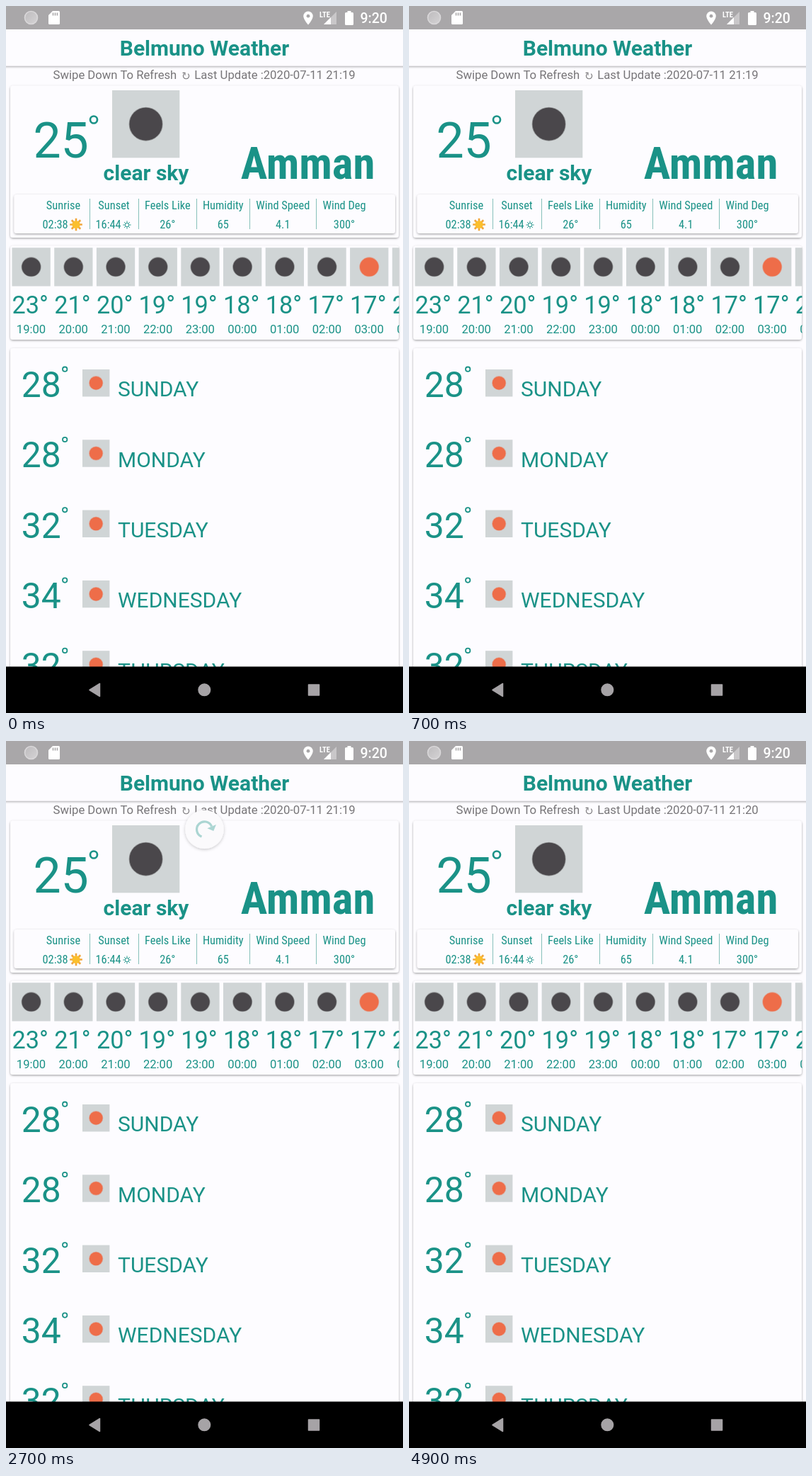
An HTML page for the animation above (5000 ms loop, 561x998 px).

```html
<!DOCTYPE html>
<html lang="en">
<head>
<meta charset="utf-8">
<title>Weather</title>
<style>
  html, body { margin: 0; width: 100%; height: 100%; overflow: hidden; background: #fdfcff; }
  svg { display: block; width: 100vw; height: 100vh; }
  text { font-family: Roboto, sans-serif; fill: #1a9287; }
  .mid { text-anchor: middle; }
  .bold { font-weight: 700; }
  .cond { font-family: "Roboto Condensed", Roboto, sans-serif; font-stretch: condensed; }
  .note { fill: #777578; }
  .light { fill: #fff; }
  .card { fill: #fdfcff; filter: url(#lift); }
  .tile { fill: #d0d5d6; }
  .ring { fill: none; stroke: #1a9287; }
</style>
</head>
<body>
<svg id="stage" viewBox="0 0 561 998" xmlns="http://www.w3.org/2000/svg">
  <defs>
    <filter id="lift" x="-5%" y="-10%" width="110%" height="125%">
      <feDropShadow dx="0" dy="1.2" stdDeviation="1.4" flood-color="#000" flood-opacity=".36"/>
    </filter>
    <filter id="float" x="-30%" y="-30%" width="160%" height="160%">
      <feDropShadow dx="0" dy="1.2" stdDeviation="2" flood-color="#000" flood-opacity=".22"/>
    </filter>
    <clipPath id="strip"><rect x="6" y="338" width="549.5" height="133"/></clipPath>
    <linearGradient id="moon" x1="0" y1="0" x2="1" y2="1">
      <stop offset="0" stop-color="#bdbbbd"/><stop offset="1" stop-color="#d5d3d5"/>
    </linearGradient>
  </defs>
  <rect width="561" height="998" fill="#fdfcff"/>

  <g id="content"></g>

  <path id="glow" d="M0 85H561V108Q280.5 188 0 108Z" fill="#000"/>
  <g id="spinner">
    <circle r="27.3" fill="#fbfafc" filter="url(#float)"/>
    <g id="mark">
      <path id="arc" class="ring" stroke-width="3.2"/>
      <path id="head" d="M-6.8 0H6.8L0 6.8Z" fill="#1a9287"/>
    </g>
  </g>

  <rect x="-6" y="20" width="573" height="64.5" fill="#fdfcff" filter="url(#lift)"/>
  <text class="mid bold" x="280.5" y="70" font-size="30">Belmuno Weather</text>

  <g fill="#fff">
    <rect width="561" height="33" fill="#a9a7a9"/>
    <circle cx="35.5" cy="16.5" r="9" fill="url(#moon)" stroke="#d9d7d9" stroke-width="1.6"/>
    <path d="M66 7H74.5Q76 7 76 8.5V24.5Q76 26 74.5 26H61.5Q60 26 60 24.5V13Z"/>
    <path d="M66.5 9.5v4M69.5 9.5v4M72.5 9.5v4" stroke="#a9a7a9" stroke-width="1.6"/>
    <path d="M427 7.5a6.7 6.7 0 0 1 6.7 6.7c0 4.8-6.7 12.3-6.7 12.3s-6.7-7.5-6.7-12.3a6.7 6.7 0 0 1 6.7-6.7z"/>
    <circle cx="427" cy="14.2" r="2.4" fill="#a9a7a9"/>
    <path d="M467 8V26H449Z" fill="#c9c7c9"/>
    <path d="M459 16V26H449Z"/>
    <text x="443" y="15.5" font-size="10.5" class="bold cond light">LTE</text>
    <path d="M482.5 7h5v2h2q1.500 0 1.500 1.500v15q0 1.500-1.500 1.500h-9q-1.500 0-1.500-1.500v-15q0-1.500 1.500-1.500h2z"/>
    <text x="500.5" y="23.5" font-size="19.5" font-weight="500" class="light">9:20</text>
  </g>

  <rect y="932.5" width="561" height="65.5"/>
  <g fill="#a6a3a6" stroke="#a6a3a6" stroke-width="1.5" stroke-linejoin="round">
    <path d="M118 965.5L132.5 956.5V974.5Z"/>
    <circle cx="280.3" cy="965.3" r="8.3"/>
    <rect x="427.5" y="958" width="15" height="15"/>
  </g>
</svg>
<script>
const LOOP = 5000, STEP = 100;
const DARK = '#4a474b', ORANGE = '#ee6d49';
const $ = id => document.getElementById(id);

const text = (x, y, size, str, cls = '') =>
  `<text x="${x}" y="${y}" font-size="${size}" class="${cls}">${str}</text>`;
const card = (x, y, w, h) =>
  `<rect class="card" x="${x}" y="${y}" width="${w}" height="${h}" rx="4"/>`;
const ring = (x, y, r, w) =>
  `<circle class="ring" cx="${x}" cy="${y}" r="${r}" stroke-width="${w}"/>`;
// The translucent stroke gives the disc its soft rim.
const tile = (x, y, size, r, color) =>
  `<rect class="tile" x="${x}" y="${y}" width="${size}" height="${size}"/>` +
  `<circle cx="${x + size / 2}" cy="${y + size / 2}" r="${r - 0.4}" fill="${color}"
    stroke="${color}" stroke-opacity=".45" stroke-width="1.6"/>`;

function rays(x, y, from, to) {
  let d = '';
  for (let i = 0; i < 8; i++) {
    const c = Math.cos(i * Math.PI / 4), s = Math.sin(i * Math.PI / 4);
    d += `M${x + c * from} ${y + s * from}L${x + c * to} ${y + s * to}`;
  }
  return d;
}

function notice() {
  return text(66.5, 102.7, 16.7, 'Swipe Down To Refresh', 'note') +
    `<path d="M251.8 95.6A4.1 4.1 0 1 0 257.2 95.6M249.6 94.4H253V97.8"
      fill="none" stroke="#777578" stroke-width="1.1"/>
    <text id="stamp" class="note" x="266.3" y="102.7" font-size="16.7"></text>`;
}

function today() {
  const facts = [
    [81, 'Sunrise'], [152.5, 'Sunset'], [228.3, 'Feels Like', '26°'],
    [306.8, 'Humidity', '65'], [391.3, 'Wind Speed', '4.1'], [478, 'Wind Deg', '300°']
  ];
  let out = card(6, 112.5, 549, 214.5) + card(11.5, 266, 538.5, 55);
  out += text(38.4, 214, 69.8, '25') + ring(124, 160.5, 5, 2.7);
  out += tile(150, 119, 95.3, 23.6, DARK);
  out += text(198, 246, 30, 'clear sky', 'mid bold');
  out += text(426.5, 243.5, 62.8, 'Amman', 'mid bold cond');
  for (const [x, name, value] of facts) {
    out += text(x, 287, 16.4, name, 'mid cond');
    if (value) out += text(x, 314, 16.4, value, 'mid cond');
  }
  out += text(51.5, 314, 16.4, '02:38', 'cond') + text(126.5, 314, 16.4, '16:44', 'cond');
  out += `<path d="${rays(99, 308.5, 5, 8.8)}" stroke="#f2a63a" stroke-width="2.6"/>
    <circle cx="99" cy="308.5" r="5.6" fill="#fbbf2d"/>
    <path d="${rays(171, 309, 3.6, 5.6)}" stroke="#1a9287"/>` + ring(171, 309, 2.8, 1);
  for (const x of [118.5, 187.5, 269.5, 344.5, 438.5])
    out += `<path d="M${x} 272V315" stroke="#86c0ba"/>`;
  return out;
}

function hours() {
  const temps = [23, 21, 20, 19, 19, 18, 18, 17, 17, 20];
  let out = card(6, 338.5, 549, 132.5) + '<g clip-path="url(#strip)">';
  temps.forEach((t, i) => {
    const dx = i * 59.7, hour = String((19 + i) % 24).padStart(2, '0');
    out += tile(8.5 + dx, 341.2, 54.3, 13.6, i < 8 ? DARK : ORANGE);
    out += text(8.5 + dx, 433.5, 34.3, t + '°');
    out += text(35.5 + dx, 462, 16.6, hour + ':00', 'mid');
  });
  return out + '</g>';
}

function days() {
  const list = [[28, 'SUNDAY'], [28, 'MONDAY'], [32, 'TUESDAY'], [34, 'WEDNESDAY'], [32, 'THURSDAY']];
  let out = card(6, 483, 549, 500);
  list.forEach(([t, name], i) => {
    const dy = i * 99.3;
    out += text(21.8, 552 + dy, 49.8, t) + ring(83.2, 512.7 + dy, 3.2, 1.8);
    out += tile(108, 513 + dy, 38.4, 9.7, ORANGE);
    out += text(158, 551.3 + dy, 30, name);
  });
  return out;
}

$('content').innerHTML = notice() + today() + hours() + days();

const ramp = (t, a, b) => Math.min(1, Math.max(0, (t - a) / (b - a)));
const easeOut = p => 1 - (1 - p) * (1 - p);
const point = (deg, r) => {
  const a = deg * Math.PI / 180;
  return [r * Math.cos(a), r * Math.sin(a)];
};

function drawArc(end, sweep) {
  const r = 11, [x0, y0] = point(end - sweep, r), [x1, y1] = point(end, r);
  $('arc').setAttribute('d', `M${x0} ${y0}A${r} ${r} 0 ${sweep > 180 ? 1 : 0} 1 ${x1} ${y1}`);
  $('head').setAttribute('transform', `translate(${x1} ${y1}) rotate(${end})`);
}

function render(t) {
  const pull = easeOut(ramp(t, 2500, 3300));
  const back = easeOut(ramp(t, 3400, 3600));
  const gone = ramp(t, 3950, 4100);
  const y = 57 + 155 * pull - 67 * back;
  const spinning = t >= 3600;

  $('spinner').style.display = t > 2500 && gone < 1 ? '' : 'none';
  $('spinner').setAttribute('transform', `translate(280.5 ${y}) scale(${1 - gone})`);
  $('mark').setAttribute('opacity', y < 144 ? 0.35 : 1);
  $('head').style.display = spinning ? 'none' : '';
  if (spinning) drawArc(145 + 0.2 * (t - 3700), 245);
  else drawArc(90 - 200 * (1 - pull), 60 + 228 * ramp(pull, 0, 0.6));

  $('glow').setAttribute('opacity', 0.035 * ramp(t, 3400, 3600) * (1 - ramp(t, 3800, 4050)));
  $('stamp').textContent = 'Last Update :2020-07-11 21:' + (t >= 3950 ? '20' : '19');
}

function tick(now) {
  const t = (now + 1) % LOOP;
  render(Math.floor(t / STEP) * STEP);
  requestAnimationFrame(tick);
}
render(0);
requestAnimationFrame(tick);
</script>
</body>
</html>
```
